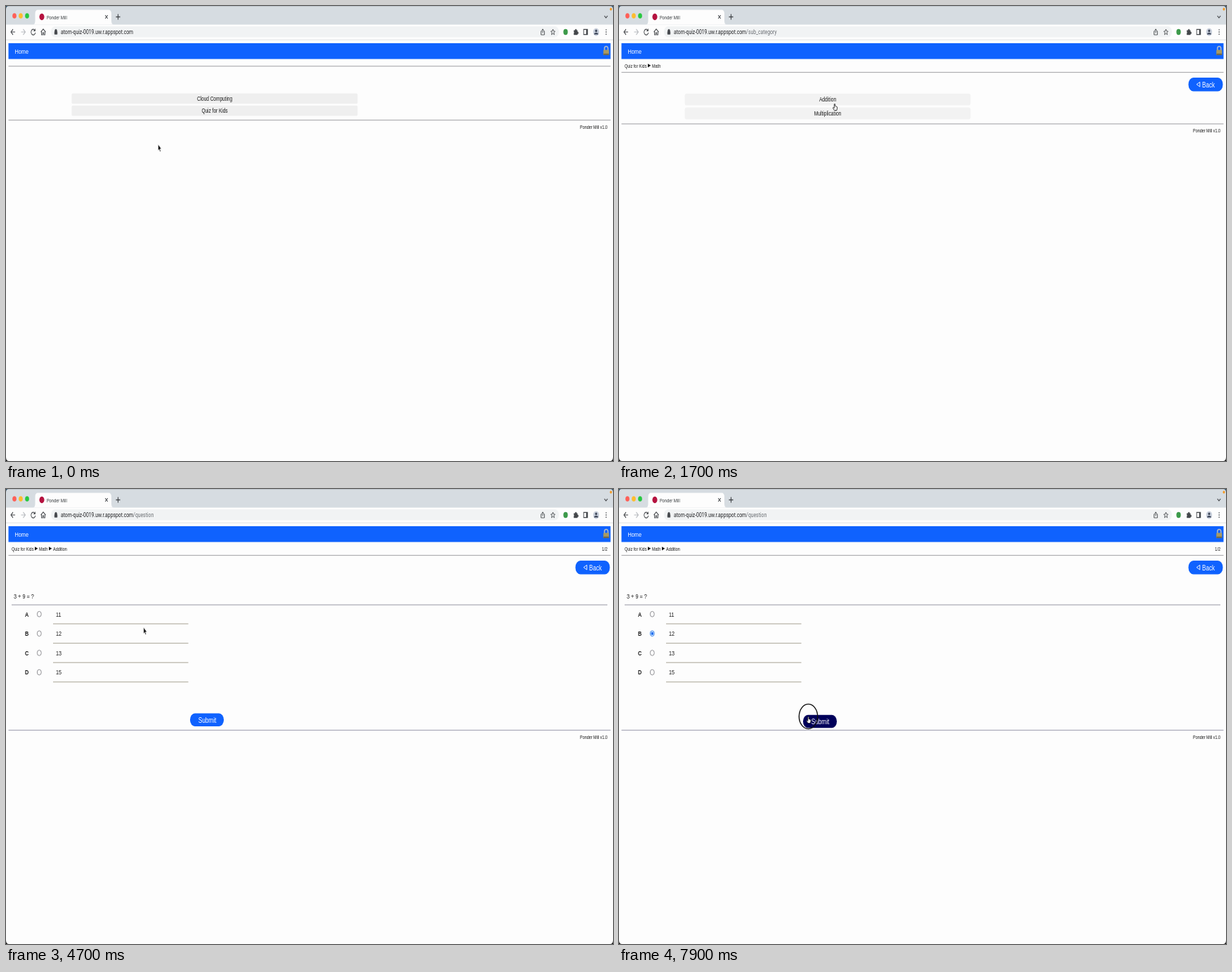
Animation, 864 px wide and 648 px high, one loop 8000 ms. Source, as an HTML page:

```html
<!DOCTYPE html>
<html lang="en">
<head>
<meta charset="utf-8">
<title>Quiz walkthrough</title>
<style>
  html, body { margin: 0; width: 100%; height: 100%; overflow: hidden; background: #fdfdfd; }
  svg { display: block; width: 864px; height: 648px; }
  text { font-family: "Liberation Sans", Arial, sans-serif; white-space: pre; }
  .ui { font-family: Roboto, sans-serif; }
</style>
</head>
<body>
<svg id="stage" viewBox="0 0 864 648"></svg>
<script>
const LOOP = 8000, SQUEEZE = 0.75;   // the recording is 16:9 shown as 4:3
const BLUE = '#0f62fe', NAVY = '#00005a', INK = '#181818', ICON = '#44474b';
const APP = 'Ponder Mill', HOST = 'atom-quiz-0019.uw.r.appspot.com';

// at: page shown, hover: pointer reaches control, click: ring, go: loading begins
const pages = [
  { at: 0, hover: 430, click: 600, go: 700, path: '', crumbs: [], rows: ['Cloud Computing', 'Quiz for Kids'], pick: 1 },
  { at: 950, hover: 1220, click: 1340, go: 1430, path: '/main_category', crumbs: ['Quiz for Kids'], rows: ['Math'], pick: 0 },
  { at: 1550, hover: 1800, click: 2400, go: 2500, path: '/sub_category', crumbs: ['Quiz for Kids', 'Math'], rows: ['Addition', 'Multiplication'], pick: 0 },
  { at: 2750, hover: 3280, click: 3700, go: 3800, path: '/group', crumbs: ['Quiz for Kids', 'Math', 'Addition'], body: groupPage },
  { at: 4050, hover: 5800, click: 7900, go: LOOP, path: '/question', crumbs: ['Quiz for Kids', 'Math', 'Addition'], body: questionPage }
];
const ANSWER_AT = 5200;

// time, x, y of the pointer hot spot
const track = [
  [0, 216.5, 197], [100, 216.5, 197], [520, 302, 168], [980, 302, 168], [1250, 307, 139],
  [1750, 307, 139], [1950, 305, 134], [2800, 305, 134], [3400, 346, 189], [4350, 346, 189],
  [5050, 47, 205], [5350, 47, 205], [5850, 264.5, 323], [6100, 264.5, 323], [7200, 269.5, 324], [LOOP, 269.5, 324]
];
const arrowTimes = [[0, 430], [2880, 3280], [4050, 4950], [5400, 5800]];

const clamp = v => Math.max(0, Math.min(1, v));
const ease = v => { v = clamp(v); return v * v * (3 - 2 * v); };
const mix = (a, b, p) => a + (b - a) * p;

const rect = (x, y, w, h, fill, r = 0, extra = '') =>
  `<rect x="${x}" y="${y}" width="${w}" height="${h}" rx="${r * SQUEEZE}" ry="${r}" fill="${fill}" ${extra}/>`;
const disc = (x, y, r, fill, extra = '') =>
  `<ellipse cx="${x}" cy="${y}" rx="${r * SQUEEZE}" ry="${r}" fill="${fill}" ${extra}/>`;
const rule = (x1, x2, y, color = '#aeaeb2') => rect(x1, y - 0.6, x2 - x1, 1.2, color);
const shape = (d, fill, extra = '') => `<path d="${d}" fill="${fill}" ${extra}/>`;
const icon = (x, y, d, color = ICON, fill = 'none', w = 1.2) =>
  `<g transform="translate(${x} ${y}) scale(${SQUEEZE} 1)">${shape(d, fill, `stroke="${color}" stroke-width="${w}"`)}</g>`;

// y is the middle of the capitals
function text(x, y, s, size = 9.7, { fill = INK, anchor = 'start', cls = '', bold = false } = {}) {
  return `<text class="${cls}" transform="translate(${x} ${y + size * 0.358}) scale(${SQUEEZE} 1)" font-size="${size}"` +
    ` fill="${fill}" text-anchor="${anchor}" font-weight="${bold ? 700 : 400}">${s}</text>`;
}

function tabStrip(loading) {
  let s = rect(0, 0, 864, 27, '#d6dce1') + rect(0, 0, 864, 0.8, '#b9c0c6');
  ['#fe5f57', '#febc2e', '#28c840'].forEach((c, i) => { s += disc(12 + 9 * i, 14, 3.8, c); });
  s += shape('M38 26.5Q41.5 26.5 41.5 21V11Q41.5 5.5 45.5 5.5H146Q150 5.5 150 11V21Q150 26.5 153.5 26.5Z', '#fdfdfd');
  if (loading) {
    s += icon(51, 15.5, 'M-4 -1.5A4.3 4.3 0 0 1 3 -3', '#8ab0e8');
    s += `<g clip-path="url(#tabClip)">${text(58, 15.8, 'https://' + HOST, 7.65, { cls: 'ui', fill: '#3c4043' })}</g>`;
    s += rect(122, 8, 16, 15, 'url(#tabFade)');
  } else {
    s += disc(51, 15.5, 4.7, '#b5123f');
    s += text(58, 15.8, APP, 7.65, { cls: 'ui', fill: '#3c4043' });
  }
  s += icon(143, 15.5, 'M-2.4 -2.4L2.4 2.4M2.4 -2.4L-2.4 2.4');
  s += icon(159.5, 15.5, 'M-4 0H4M0 -4V4', ICON, 'none', 1.4);
  s += icon(854, 15.5, 'M-3 -1.5L0 1.5L3 -1.5');
  return s + disc(861, 4.5, 2, '#f59a23');
}

function toolbar(path, loading) {
  let s = rect(0, 26.5, 864, 21.5, '#fdfdfd') + rect(64, 29, 723, 15.5, '#f1f3f4', 7.75) + rect(0, 47.7, 864, 0.9, '#dcdee0');
  s += icon(10, 37, 'M4 0H-4M0 -4L-4 0L0 4');
  s += icon(24.5, 37, 'M-4 0H4M0 -4L4 0L0 4', '#b6b9bd');
  s += loading ? icon(38.7, 37, 'M-3.4 -3.4L3.4 3.4M3.4 -3.4L-3.4 3.4')
    : icon(38.7, 37, 'M3 -2.5A4 4 0 1 0 4 .8M3.6 -4.5V-1.6H.7');
  s += icon(53, 37, 'M-4.5 0L0 -4.2L4.5 0M-3.2 -.8V4H-1V1H1V4H3.2V-.8');
  s += icon(71, 37, 'M-1.8 -.5V-2A1.8 1.8 0 0 1 1.8 -2V-.5M-2.4 -.4H2.4V3.2H-2.4Z', ICON, ICON, 0.8);
  s += text(78, 37.1, `${HOST}<tspan fill="#6a6e73">${path}</tspan>`, 9.08, { cls: 'ui', fill: '#202124' });
  s += icon(764, 37, 'M-1.6 -1.2H-3.2V4H3.2V-1.2H1.6M0 1.5V-4M-1.8 -2.4L0 -4.2L1.8 -2.4', ICON, 'none', 1);
  s += icon(778.5, 37, 'M0 -4L1.2 -1.2L4 -1L1.8 .9L2.6 3.8L0 2.2L-2.6 3.8L-1.8 .9L-4 -1L-1.2 -1.2Z', ICON, 'none', 1);
  s += disc(796.5, 37, 4.2, '#3d9a4b');
  s += icon(811, 37, 'M-3.5 -2.2H-1.2A1.4 1.4 0 1 1 1.5 -2.2H3V0A1.4 1.4 0 1 1 3 2.6V4H-3.5V1.8A1.4 1.4 0 0 0 -3.5 -.4Z', ICON, ICON, 0.5);
  s += icon(825, 37, 'M-3.7 -3.7H3.7V3.7H-3.7Z', ICON) + rect(825.8, 33.3, 2.2, 7.4, ICON);
  s += disc(840, 37, 5.6, '#c9d0dc') + disc(840, 35.3, 1.9, '#3c4558') + shape('M837 40.5Q837 37.9 840 37.9T843 40.5Z', '#3c4558');
  [-3.2, 0, 3.2].forEach(d => { s += disc(854.2, 37 + d, 0.9, ICON); });
  return s;
}

function header(page) {
  let s = rect(3.5, 53, 857, 22.5, BLUE) + text(12.5, 64.2, 'Home', 9.75, { fill: '#fff' });
  s += shape('M851.8 63V60.5Q851.8 57.5 854.3 57.5T856.8 60.5V63', 'none', 'stroke="#b8bec6" stroke-width="1.4"');
  s += rect(850.3, 62.5, 8, 7.5, '#a99a62', 1) + rect(850.3, 67.8, 8, 2.2, '#6f6a52', 1);
  const n = page.crumbs.length;
  s += rule(3.5, 860.5, n ? 94.5 : 85.7);
  page.crumbs.forEach((c, i) => {
    s += text([8, 47, 67][i], 85, c, 7.33);
    if (i) s += shape(`M${21 + 20 * i} 82.2L${25.4 + 20 * i} 84.8L${21 + 20 * i} 87.4Z`, INK);
  });
  if (n) {
    s += rect(810.5, 102, 49, 19.5, BLUE, 9.5) + text(830, 112, 'Back', 10.8, { fill: '#fff' });
    s += shape('M826.8 108.3V115L822.2 111.6Z', 'none', 'stroke="#fff" stroke-width=".9"');
  }
  return s;
}

const footer = (y, color) => rule(3.5, 860.5, y, color) + text(856, y + 9.5, APP + ' v1.0', 7.27, { anchor: 'end' });

function listPage(page, t) {
  const p = page.at ? ease((t - page.at) / 450) : ease((t - 50) / 450);
  const h = ease((t - page.hover) / 220);
  const pitch = mix(17.2, 27.5, p), height = mix(14.8, 23, p), radius = mix(2, 8.5, p);
  let s = '';
  page.rows.forEach((label, i) => {
    const mid = mix(131.9, 136.5, p) + i * pitch, hot = i === page.pick ? h : 0;
    const box = (fill, alpha) => rect(93.5, mid - height / 2, 407, height, fill, radius, `opacity="${alpha}"`);
    s += box('#efefef', 1 - p) + (hot ? box(NAVY, hot) : '');
    const shade = Math.round(mix(24, 255, hot));
    s += text(297, mid, label, mix(8.68, 9.7, p), { anchor: 'middle', fill: `rgb(${shade},${shade},${shade})` });
  });
  return s + footer(128.1 + page.rows.length * pitch);
}

function action(page, t, x, y, w, label) {
  const hot = t >= page.hover, down = t >= page.click && t < page.click + 100 ? 2.3 : 0;
  return rect(x, y + down, w, 18.4, hot ? NAVY : BLUE, 9) + text(x + (label === 'Start' ? 13 : 11.7), y + down + 9.2, label, 11, { fill: '#fff' }) +
    (label === 'Start' ? shape(`M${x + 33.6} ${y + down + 5.2}L${x + 40.2} ${y + down + 8.7}L${x + 33.6} ${y + down + 12.2}Z`, '#fff') : '');
}

function groupPage(page, t) {
  const facts = [['Category:', 'Quiz for Kids'], ['Subcategory:', 'Math'], ['Question group:', 'Addition'], ['Questions:', '2']];
  let s = '';
  facts.forEach(([k, v], i) => {
    const y = 129.5 + 13.3 * i;
    s += text(264, y, k, 9.6, { bold: true }) + text(321.7, y, v, 9.6);
  });
  return s + action(page, t, 321.8, 177.3, 54, 'Start') + footer(212.2);
}

function questionPage(page, t) {
  let s = text(856, 85, '1/2', 7.33, { anchor: 'end' }) + text(11, 152.4, '3 + 9 = ?', 9.75) + rule(8, 856, 165, '#a9a9b4');
  [11, 12, 13, 15].forEach((value, i) => {
    const y = 178.2 + 27.6 * i, on = i === 1 && t >= ANSWER_AT;
    s += text(27, y, 'ABCD'[i], 9.7, { bold: true }) + text(71, y, value, 9.7);
    s += disc(47.3, y, 3.9, '#fff', `stroke="${on ? '#1a73e8' : '#85858a'}" stroke-width=".9"`);
    if (on) s += disc(47.3, y, 2.4, '#1a6cf0');
    s += rule(67, 259.5, y + 13.8, '#b6b2a6');
  });
  return s + action(page, t, 262, 319.5, 48, 'Submit') + footer(343.5, '#a9a9b8');
}

function pointer(t) {
  const i = Math.max(1, track.findIndex(k => k[0] > t)), [a, b] = [track[i - 1], track[i]];
  const p = ease((t - a[0]) / (b[0] - a[0])), x = mix(a[1], b[1], p), y = mix(a[2], b[2], p);
  const arrow = arrowTimes.some(([from, to]) => t >= from && t < to);
  const ring = [ANSWER_AT, ...pages.map(g => g.click)].some(c => t >= c && t < c + 100);
  return (arrow ? icon(x, y, 'M0 0V9L2 7.2L3.5 10.5L5 9.8L3.6 6.6H6.3Z', '#fff', '#111', 0.6)
    : icon(x, y, 'M-.9 .8Q0 -.5 .9 .8V3.5L4.2 4.4Q5 4.7 4.8 6L4 9.6H-.8L-3.4 6.2Q-3 4.9 -1.8 5.8L-.9 6.5Z', '#111', '#fff', 0.9)) +
    (ring ? disc(x, y, 17.6, 'none', 'stroke="#111" stroke-width="1.4"') : '');
}

const DEFS = `<defs><clipPath id="tabClip"><rect x="58" y="6" width="79" height="20"/></clipPath>
  <linearGradient id="tabFade"><stop stop-color="#fdfdfd" stop-opacity="0"/><stop offset="1" stop-color="#fdfdfd"/></linearGradient></defs>`;
const CORNERS = shape('M0 642.5V648H4.2Q0 648 0 642.5ZM864 642.5V648H859.8Q864 648 864 642.5Z', '#111') +
  shape('M0 0H4Q0 0 0 5ZM864 0H860Q864 0 864 5Z', '#2d5068');

function scene(t) {
  const i = pages.findLastIndex(g => t >= g.at), page = pages[i];
  const loading = t >= page.go, path = (loading ? pages[i + 1] : page).path;
  return DEFS + rect(0, 0, 864, 648, '#fdfdfd') + tabStrip(loading) + toolbar(path, loading) + header(page) +
    (page.rows ? listPage(page, t) : page.body(page, t)) + pointer(t) + CORNERS;
}

const stage = document.getElementById('stage');
const start = performance.now();
let shown = '';
function draw() {
  const next = scene(Math.max(0, performance.now() - start) % LOOP);
  if (next !== shown) stage.innerHTML = shown = next;
  requestAnimationFrame(draw);
}
draw();
</script>
</body>
</html>
```
